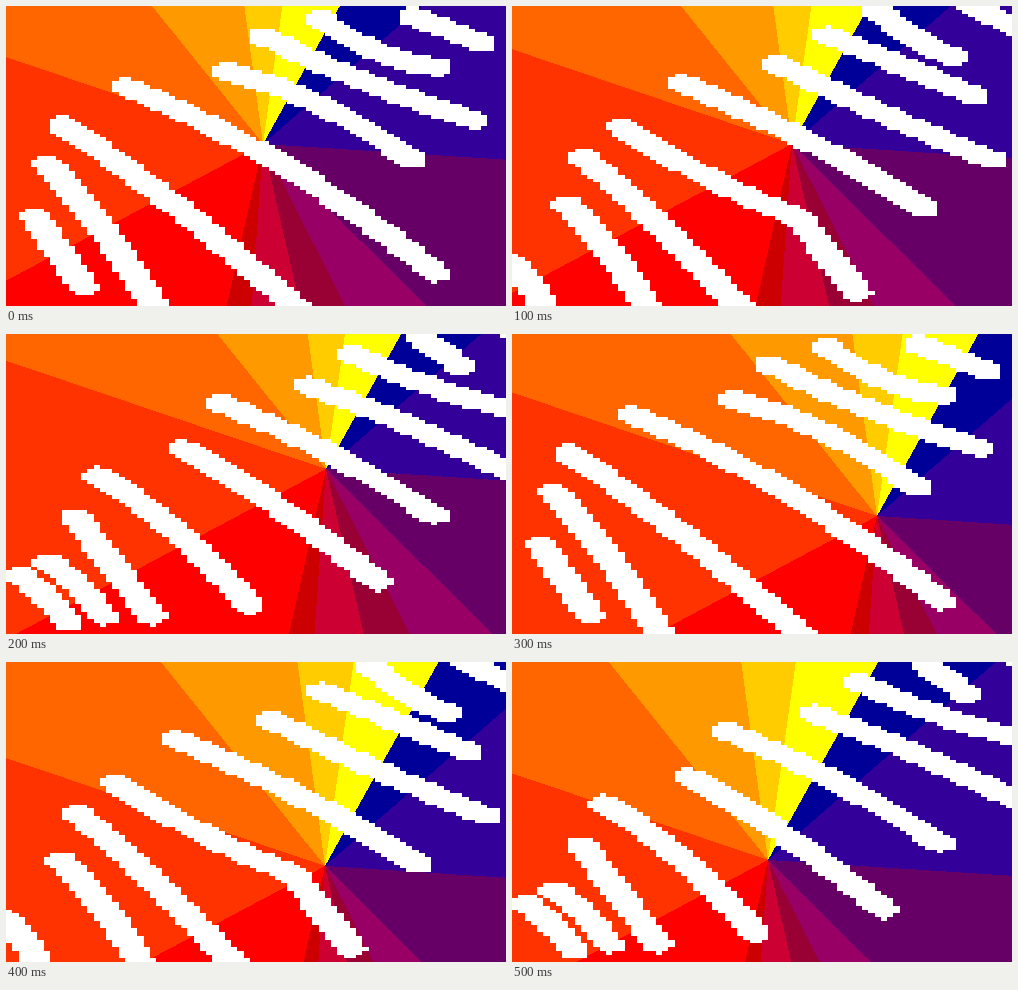
These frames come from a looping animation (500x300 px, 0.6 s). An HTML page with a canvas:

```html
<!DOCTYPE html>
<html lang="en">
<head>
<meta charset="utf-8">
<title>Colour wheel and streaks</title>
<style>
  html, body { margin: 0; width: 100%; height: 100%; overflow: hidden; background: #f30; }
  canvas { display: block; width: 500px; height: 300px; }
</style>
</head>
<body>
<canvas id="stage" width="500" height="300"></canvas>
<script>
const W = 500, H = 300, GRID = 80, BRUSH = 2.4, STEP = 100;
const ctx = document.getElementById('stage').getContext('2d');

// Sector start angles, clockwise from straight up, in degrees.
const SECTORS = [
  [8, '#ff0'], [29.1, '#009'], [49, '#309'], [93.7, '#606'], [134.7, '#906'],
  [153.1, '#903'], [167.1, '#c03'], [184, '#c00'], [192.6, '#f00'], [242, '#f30'],
  [288.7, '#f60'], [321.2, '#f90'], [352.3, '#fc0']
];

// Wheel centre at each step.
const CENTRES = [[257, 138], [280, 138], [320, 135], [365, 182], [319, 204], [256, 198]];

// Each stroke is a bow: start, end and how far its middle hangs below the chord.
const POSES = [
  [
    [406, 10, 475, 37], [314, 13, 431, 61, 9], [257, 30, 468, 114, 5],
    [222, 66, 406, 154, -11], [119, 81, 430, 267, -16], [57, 119, 300, 311, -8],
    [41, 158, 150, 304, -9], [29, 211, 78, 281]
  ],
  [
    [456, -2, 505, 21], [364, 3, 442, 51, 5], [315, 29, 462, 89], [264, 57, 481, 154, 3],
    [169, 77, 412, 202, -7], [109, 120, 287, 212, 6], [287, 212, 345, 286],
    [71, 151, 228, 302, -5], [55, 199, 135, 302, -8], [-5, 254, 33, 304, -7]
  ],
  [
    [502, -4, 510, 0], [413, 2, 455, 32], [346, 20, 505, 75, 5], [302, 52, 505, 139, -4],
    [214, 69, 428, 181, -7], [177, 115, 372, 248, -7], [92, 142, 243, 271, -11],
    [70, 184, 146, 282], [42, 229, 97, 282, -6], [15, 242, 62, 288, -3]
  ]
];

function dab(g, x, y) {
  for (let j = Math.floor(y - 3); j <= y + 3; j++) {
    for (let i = Math.floor(x - 3); i <= x + 3; i++) {
      if (Math.hypot(i + 0.5 - x, j + 0.5 - y) <= BRUSH) g.fillRect(i, j, 1, 1);
    }
  }
}

function drawStroke(g, [x1, y1, x2, y2, sag = 0]) {
  for (let s = 0; s <= 120; s++) {
    const t = s / 120;
    const x = x1 + (x2 - x1) * t;
    const y = y1 + (y2 - y1) * t + 4 * sag * t * (1 - t);
    dab(g, x * GRID / W, y * GRID / H);
  }
}

// Strokes live on a coarse grid that is stretched to the stage.
function makeLayer(strokes) {
  const layer = document.createElement('canvas');
  layer.width = layer.height = GRID;
  const g = layer.getContext('2d');
  g.fillStyle = '#fff';
  strokes.forEach(s => drawStroke(g, s));
  return layer;
}

const layers = POSES.map(makeLayer);

function drawWheel([x, y]) {
  const first = SECTORS[0][0];
  const wheel = ctx.createConicGradient((first - 90) * Math.PI / 180, x, y);
  SECTORS.forEach(([start, colour], i) => {
    const end = i + 1 < SECTORS.length ? SECTORS[i + 1][0] : first + 360;
    wheel.addColorStop((start - first) / 360, colour);
    wheel.addColorStop((end - first) / 360, colour);
  });
  ctx.fillStyle = wheel;
  ctx.fillRect(0, 0, W, H);
}

let shown = -1;

function render() {
  const step = Math.floor(performance.now() / STEP) % CENTRES.length;
  if (step !== shown) {
    shown = step;
    drawWheel(CENTRES[step]);
    ctx.imageSmoothingEnabled = false;
    ctx.drawImage(layers[step % layers.length], 0, 0, W, H);
  }
  requestAnimationFrame(render);
}

render();
</script>
</body>
</html>
```
